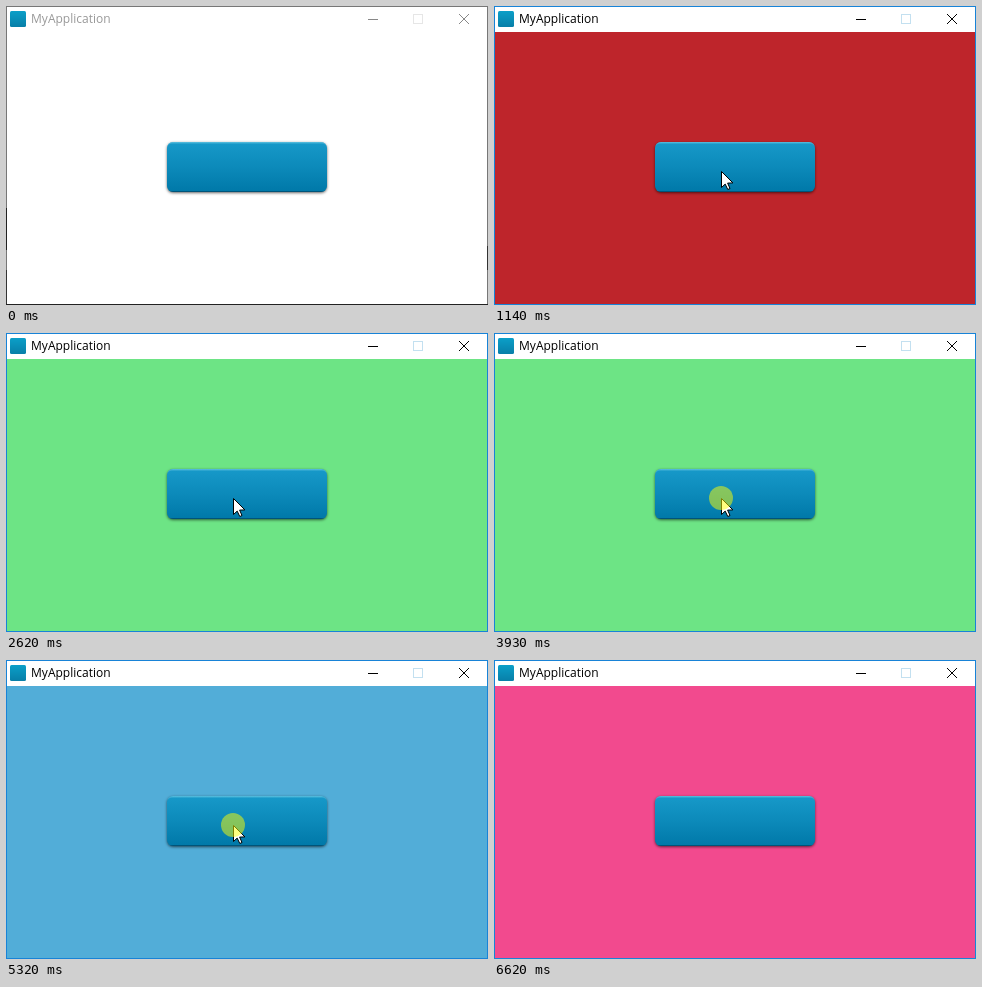
Write an HTML page with a canvas that moves like this. It is 482 px wide and 299 px high and loops after 7.23 s.

```html
<!DOCTYPE html>
<html>
<head>
<meta charset="utf-8">
<style>
html, body { margin: 0; width: 100%; height: 100%; overflow: hidden; }
canvas { display: block; }
</style>
</head>
<body>
<canvas id="stage" width="482" height="299"></canvas>
<script>
const ctx = document.getElementById('stage').getContext('2d');
const LOOP = 7230;
const WHITE = '#fff', RED = '#be252b', GREEN = '#6de485', BLUE = '#52add8', PINK = '#f24a8e';

// [start time, client colour, window active, button pressed, click marker]
const states = [
  [0, WHITE, 0, 0, 0],
  [1010, WHITE, 0, 0, 1], [1060, WHITE, 1, 1, 1], [1140, RED, 1, 0, 0],
  [2490, RED, 1, 1, 1], [2570, GREEN, 1, 0, 1], [2620, GREEN, 1, 0, 0],
  [3930, GREEN, 1, 0, 1], [3980, GREEN, 1, 1, 1], [4060, BLUE, 1, 0, 0],
  [5320, BLUE, 1, 0, 1], [5360, BLUE, 1, 1, 1], [5460, PINK, 1, 0, 0]
];

function rect(x, y, w, h, color) {
  ctx.fillStyle = color;
  ctx.fillRect(x, y, w, h);
}

function line(color, ...points) {
  ctx.strokeStyle = color;
  ctx.lineWidth = 1;
  ctx.beginPath();
  points.forEach(([x, y], i) => i % 2 ? ctx.lineTo(x, y) : ctx.moveTo(x, y));
  ctx.stroke();
}

function rounded(x, y, w, h, r) {
  ctx.beginPath();
  ctx.roundRect(x, y, w, h, r);
}

function gradient(y0, y1, ...colors) {
  const g = ctx.createLinearGradient(0, y0, 0, y1);
  colors.forEach((c, i) => g.addColorStop(i / (colors.length - 1), c));
  return g;
}

function drawWindow(color, active) {
  rect(0, 0, 482, 299, active ? '#1883d7' : '#777');
  if (!active) {
    rect(0, 202, 1, 42, '#222');
    rect(0, 264, 1, 35, '#333');
    rect(481, 240, 1, 24, '#333');
    rect(0, 298, 482, 1, '#222');
  }
  rect(1, 1, 480, 297, WHITE);
  rect(1, 26, 480, 272, color);

  ctx.fillStyle = gradient(5, 21, '#0b9fc8', '#087fa8');
  rounded(4, 5, 16, 16, 1.5);
  ctx.fill();

  ctx.font = '12px "Open Sans", "Noto Sans", sans-serif';
  ctx.fillStyle = active ? '#000' : '#999';
  ctx.fillText('MyApplication', 25, 17);

  const ink = active ? '#000' : '#888';
  rect(362, 13, 10, 1, ink);
  ctx.strokeStyle = active ? '#c3e0f0' : '#e6e6e6';
  ctx.lineWidth = 1;
  ctx.strokeRect(407.5, 8.5, 9, 9);
  line(ink, [453, 8], [463, 18], [463, 8], [453, 18]);
}

function drawButton(pressed) {
  ctx.save();
  if (pressed) {
    rounded(161, 137, 160, 50, 6);
    ctx.fillStyle = 'rgba(255,255,255,.4)';
    ctx.fill();
  } else {
    ctx.shadowColor = 'rgba(0,0,0,.6)';
    ctx.shadowBlur = 3;
    ctx.shadowOffsetY = 1;
  }
  rounded(161, 136, 160, 50, 6);
  ctx.fillStyle = pressed
    ? gradient(136, 186, '#005f83', '#00678d', '#00729e')
    : gradient(136, 186, '#1799c9', '#0c8aba', '#0078a8');
  ctx.fill();
  ctx.restore();

  ctx.save();
  rounded(161, 136, 160, 50, 6);
  ctx.clip();
  ctx.lineWidth = 2;
  if (pressed) {
    ctx.strokeStyle = 'rgba(0,40,60,.5)';
    ctx.shadowColor = 'rgba(0,30,50,.5)';
    ctx.shadowBlur = 3;
    rounded(160.5, 135.5, 161, 51, 6);
    ctx.stroke();
  } else {
    ctx.strokeStyle = gradient(136, 142, 'rgba(110,200,228,.7)', 'rgba(110,200,228,0)');
    rounded(160, 136.5, 162, 54, 6);
    ctx.stroke();
    rect(161, 185, 160, 1, 'rgba(0,55,85,.55)');
  }
  ctx.restore();
}

function drawCursor(x, y) {
  ctx.save();
  ctx.translate(x + 0.5, y + 0.5);
  ctx.beginPath();
  [[0, 0], [0, 16], [3.7, 12.6], [6.3, 18], [8.5, 17], [6.1, 11.6], [11.4, 11.4]]
    .forEach(p => ctx.lineTo(...p));
  ctx.closePath();
  ctx.fillStyle = WHITE;
  ctx.strokeStyle = '#000';
  ctx.lineWidth = 1;
  ctx.fill();
  ctx.stroke();
  ctx.restore();
}

// The pointer glides in from below, rests on the button, then leaves downwards.
function cursorOffset(t) {
  if (t < 220 || t >= 6620) return null;
  if (t < 830) {
    const p = Math.floor((t - 220) / 610 * 13 + 1) / 14;
    return (1 - p) ** 2;
  }
  if (t < 6210) return 0;
  return (Math.floor((t - 6210) / 410 * 9 + 1) / 9) ** 2 * 0.9;
}

function draw(t) {
  const [, color, active, pressed, marker] = states.findLast(s => s[0] <= t);
  drawWindow(color, active);
  drawButton(pressed);
  const d = cursorOffset(t);
  if (d !== null) drawCursor(227 + Math.round(d * 5), 165 + Math.round(d * 125));
  if (marker) {
    ctx.fillStyle = 'rgba(255,255,0,.5)';
    ctx.beginPath();
    ctx.arc(227, 165, 12, 0, Math.PI * 2);
    ctx.fill();
  }
}

const start = performance.now();
function tick() {
  draw((performance.now() - start) % LOOP);
  requestAnimationFrame(tick);
}
tick();
</script>
</body>
</html>
```
